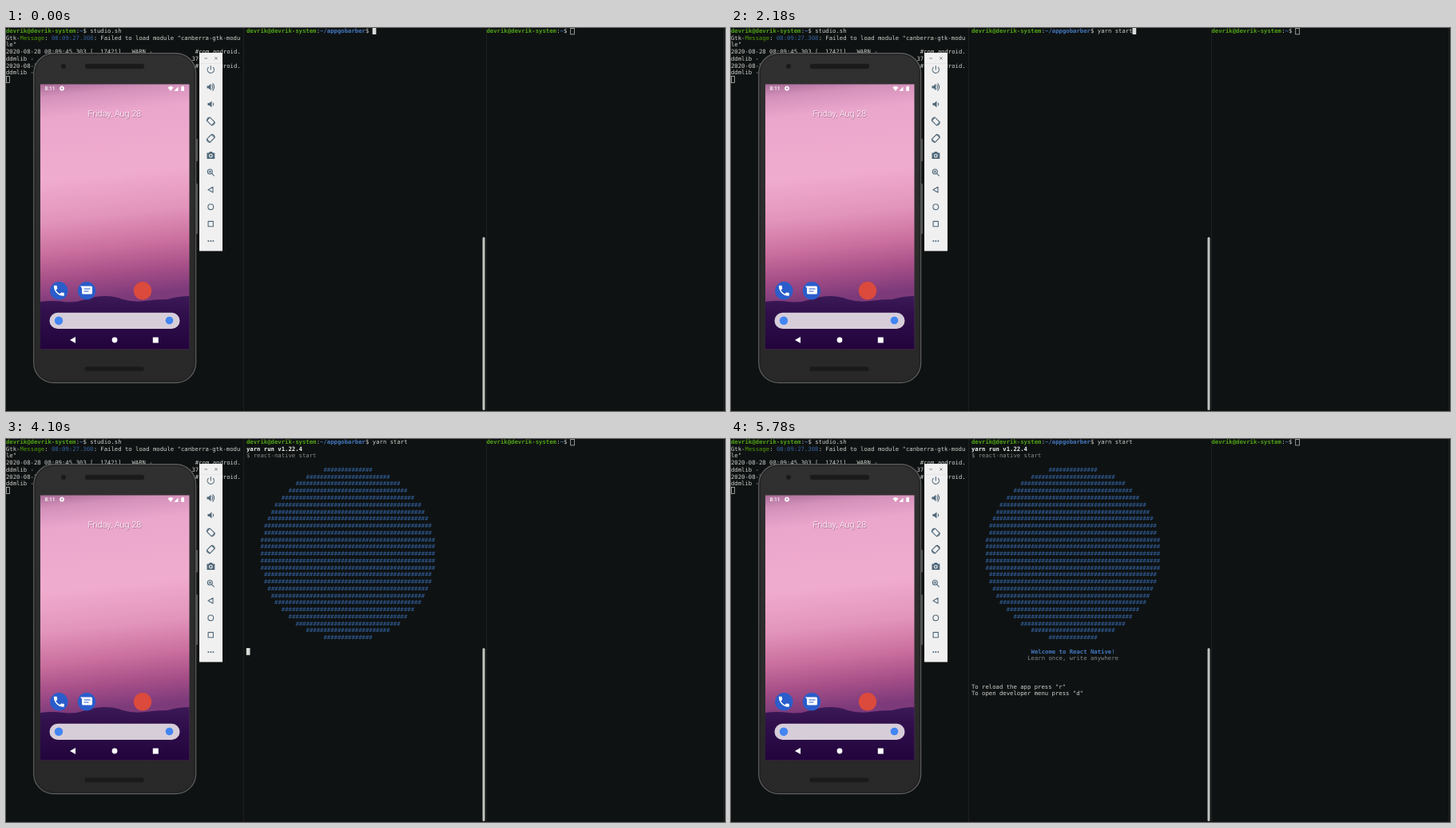
An HTML page that plays this animation: 900 px wide and 480 px high, repeating every 8 s.

```html
<!DOCTYPE html>
<html lang="en">
<head>
<meta charset="utf-8">
<title>Terminal and emulator</title>
<style>
html, body { margin: 0; width: 100%; height: 100%; overflow: hidden; background: #0f1212; }
svg { display: block; width: 900px; height: 480px; }
text { white-space: pre; text-rendering: geometricPrecision; }
.term text { font: 7.28px "DejaVu Sans Mono", monospace; fill: #cdd0cb; }
.term .green { fill: #4e9a06; }
.term .user { fill: #50a518; font-weight: bold; }
.term .blue { fill: #3465a4; }
.term .path { fill: #4479c0; font-weight: bold; }
.term .dim { fill: #858885; }
.term .bright { fill: #eef0ec; font-weight: bold; }
.ui { font-family: Roboto, sans-serif; fill: #fff; }
.tools { fill: none; stroke: #50697a; stroke-width: 1.1; stroke-linejoin: round; stroke-linecap: round; }
.tools .f { fill: #50697a; stroke: none; }
</style>
</head>
<body>
<svg viewBox="0 0 900 480">
  <defs>
    <linearGradient id="sky" x1="0" y1="0" x2="0.06" y2="1">
      <stop offset="0" stop-color="#aa6c98"/>
      <stop offset=".05" stop-color="#d391ba"/>
      <stop offset=".13" stop-color="#eba6cc"/>
      <stop offset=".36" stop-color="#f0acce"/>
      <stop offset=".52" stop-color="#e294bb"/>
      <stop offset=".64" stop-color="#ca6f9e"/>
      <stop offset=".74" stop-color="#a64f88"/>
      <stop offset=".83" stop-color="#7d3a7a"/>
    </linearGradient>
    <linearGradient id="hill" x1="0" y1="0" x2="0" y2="1">
      <stop offset="0" stop-color="#3c1a57"/>
      <stop offset=".3" stop-color="#31104c"/>
      <stop offset="1" stop-color="#22043c"/>
    </linearGradient>
    <linearGradient id="case" x1="0" y1="0" x2="0" y2="1">
      <stop offset="0" stop-color="#303030"/>
      <stop offset="1" stop-color="#282828"/>
    </linearGradient>
    <g id="turn">
      <rect x="-2.8" y="-4.2" width="5.6" height="8.4" transform="rotate(-45)"/>
      <path d="M-4.9 -1.5Q-4.5 -4.5 -1.5 -5M4.9 1.5Q4.5 4.5 1.5 5"/>
    </g>
  </defs>

  <rect width="900" height="480" fill="#0f1212"/>
  <path d="M297.5 0V480M601.5 0V480M898.5 0V480" stroke="#1d2121"/>
  <rect x="596.5" y="262" width="3" height="217" rx="1.5" fill="#c2c4c2"/>

  <g class="term" id="term"></g>
  <rect id="cursor" width="4.7" height="8.8" fill="#d9dcd8"/>
  <g fill="none" stroke="#b4b7b3" stroke-width=".8">
    <rect x=".5" y="60.5" width="4" height="8"/>
    <rect x="706.7" y=".5" width="4.8" height="7.4"/>
  </g>

  <!-- phone -->
  <path d="M239 139V167M239 195V258" stroke="#6c6e6e" stroke-width="1.4"/>
  <rect x="34.7" y="31.7" width="203" height="413" rx="25" fill="url(#case)" stroke="#5c5d5d" stroke-width="1.2"/>
  <rect x="36.4" y="33.4" width="199.6" height="409.6" rx="23.5" fill="none" stroke="#202020"/>
  <g fill="#191a1a" stroke="#222323" stroke-width=".6">
    <rect x="99" y="45" width="74" height="6" rx="2.5"/>
    <rect x="98.5" y="424.5" width="74" height="5.5" rx="2.5"/>
    <circle cx="72" cy="48" r="3"/>
  </g>
  <rect x="43" y="70.5" width="186.5" height="332" fill="url(#sky)"/>
  <path fill="url(#hill)" d="M43 343Q58 341 72 343T100 340Q112 336 124 336T146 340Q160 344 174 342T202 340Q216 336 229.5 336V402.5H43Z"/>

  <g class="ui">
    <text x="48.5" y="78.2" font-size="6.7" font-weight="500">8:11</text>
    <circle cx="70" cy="75.7" r="1.9" fill="none" stroke="#fff" stroke-width="1.5"/>
    <circle cx="70" cy="75.7" r="2.8" fill="none" stroke="#fff" stroke-width=".8" stroke-dasharray="1.1"/>
    <path d="M202.5 74.5Q206 71.5 209.5 74.5L206 79ZM210.5 79L215.5 73.5V79ZM219.3 73.5H220.3V72.7H222V73.5H223V79H219.3Z"/>
    <g font-size="10.9" font-weight="300" text-anchor="middle">
      <text x="136.6" y="112" fill="#6b3a5c" opacity=".6">Friday, Aug 28</text>
      <text x="136" y="111.3">Friday, Aug 28</text>
    </g>
  </g>

  <g fill="#2a5dcb">
    <circle cx="66.3" cy="329.3" r="11.2"/>
    <circle cx="101" cy="329.3" r="11.2"/>
  </g>
  <path fill="#fff" transform="translate(57.7 320.7) scale(.72)" d="M6.6 10.8Q8.8 15.2 13.2 17.4L15.4 15.2Q15.9 14.8 16.4 14.9Q18.2 15.5 20 15.5Q21 15.5 21 16.5V20Q21 21 20 21A17 17 0 0 1 3 4Q3 3 4 3H7.5Q8.5 3 8.5 4Q8.5 5.8 9.1 7.6Q9.2 8.1 8.8 8.6Z"/>
  <path d="M93 323.5H106.5Q108 323.5 108 325V332Q108 333.5 106.5 333.5H96.5Q95 333.5 95 332V326Z" fill="#fff"/>
  <path d="M97.5 327H105.5M97.500 330H103.5" stroke="#2a5dcb" stroke-width="1.2"/>
  <circle cx="171" cy="329.3" r="11.2" fill="#db4a3c"/>

  <rect x="54.5" y="356.7" width="163" height="20.3" rx="10.1" fill="#d6cdd9"/>
  <circle cx="66" cy="366.8" r="5.2" fill="#4285f4"/>
  <circle cx="204.5" cy="366.5" r="4.8" fill="#4285f4"/>
  <g fill="#fff">
    <path d="M80 391L87 387V395Z"/>
    <circle cx="136" cy="391" r="3.4"/>
    <rect x="183.8" y="387.6" width="7" height="7"/>
  </g>

  <!-- emulator toolbar -->
  <rect x="242" y="31" width="29" height="248.5" fill="#f1f0f0"/>
  <path d="M242 44.5H271" stroke="#e2e2e2" stroke-width=".7"/>
  <path d="M248.5 38H252M261.3 36.3L264.5 39.5M264.5 36.3L261.3 39.5" stroke="#777" stroke-width=".9"/>
  <g class="tools">
    <path d="M256.3 47.5V52M253.3 49.3A4.2 4.2 0 1 0 259.3 49.3"/>
    <path class="f" d="M251.5 72.5H253.5L256.5 69.8V78.2L253.5 75.5H251.5ZM252.5 94H254.5L257.5 91.5V99.5L254.5 97H252.5Z"/>
    <path d="M258 71.8Q259.5 74 258 76.2M258.8 69.6Q262.5 74 258.8 78.4M259.2 94Q260.3 95.5 259.2 97"/>
    <use href="#turn" transform="translate(256.3 117)"/>
    <use href="#turn" transform="translate(256.3 138.3) scale(-1 1)"/>
    <path class="f" fill-rule="evenodd" d="M251.5 156.5H253.8L255 155H257.7L259 156.5H261.3V164H251.5ZM256.3 157.7A2.4 2.4 0 1 0 256.4 157.7Z"/>
    <circle class="f" cx="256.3" cy="160.1" r="1.3"/>
    <circle cx="255.3" cy="180" r="3"/>
    <path d="M257.6 182.3L260.4 185.2M254 180H256.6M255.3 178.7V181.3"/>
    <path d="M253 202.7L259 199.3V206.1Z"/>
    <circle cx="256.3" cy="224.2" r="3.4"/>
    <rect x="253.1" y="242.4" width="6.3" height="6.3"/>
    <g class="f"><circle cx="253.3" cy="267" r="1"/><circle cx="256.3" cy="267" r="1"/><circle cx="259.3" cy="267" r="1"/></g>
  </g>
</svg>

<script>
const LOOP = 8000, CELL = 4.385, LINE = 8.76;
const LEFT = 0, MID = 301, RIGHT = 601.5;
const HOST = 'devrik@devrik-system';
const COMMAND = 'yarn start';
const KEYS = [500, 580, 740, 820, 980, 1380, 1620, 1700, 1860, 1940];
const BLINKS = [2580, 2980, 3380, 3780, 4180, 4580, 5060, 5380, 5780];
// time and row of each cursor jump
const JUMPS = [[3060, 1], [3220, 2], [3460, 3], [3940, 30], [4820, 38]];

const term = document.getElementById('term');
const cursor = document.getElementById('cursor');
const timed = [];

function put(pane, row, col, str, cls = '', at = 0) {
  const el = document.createElementNS('http://www.w3.org/2000/svg', 'text');
  el.setAttribute('x', pane + col * CELL);
  el.setAttribute('y', row * LINE + 5.9);
  el.setAttribute('class', cls);
  el.textContent = str;
  term.append(el);
  if (at) timed.push({ el, at });
  return el;
}

function prompt(pane, dir) {
  put(pane, 0, 0, HOST, 'user');
  put(pane, 0, 20, ':');
  put(pane, 0, 21, dir, 'path');
  put(pane, 0, 21 + dir.length, '$');
}

prompt(LEFT, '~');
prompt(MID, '~/appgobarber');
prompt(RIGHT, '~');

put(LEFT, 0, 24, 'studio.sh');
put(LEFT, 1, 0, 'Gtk-');
put(LEFT, 1, 4, 'Message', 'green');
put(LEFT, 1, 11, ':');
put(LEFT, 1, 13, '08:09:27.308', 'blue');
put(LEFT, 1, 25, ': Failed to load module "canberra-gtk-modu');
put(LEFT, 2, 0, 'le"');
for (const row of [3, 5]) {
  put(LEFT, row, 0, '2020-08-28 08:09:45.303 [  17421]   WARN -');
  put(LEFT, row, 54, '#com.android.');
  put(LEFT, row + 1, 0, 'ddmlib - ');
}
put(LEFT, 4, 53, '37');

const typed = put(MID, 0, 36, '');
put(MID, 1, 0, 'yarn run v1.22.4', 'bright', 3220);
put(MID, 2, 0, '$ react-native start', 'dim', 3460);

// plain disc of hash signs
for (let i = 0; i < 25; i++) {
  const half = Math.round(Math.sqrt(109 ** 2 - ((i - 12) * LINE) ** 2) / CELL);
  put(MID, i + 4, 29 - half, '#'.repeat(half * 2), 'blue', 3940);
}

put(MID, 30, 17, 'Welcome to React Native!', 'path', 4820);
put(MID, 31, 16, 'Learn once, write anywhere', 'dim', 4820);
put(MID, 35, 0, 'To reload the app press "r"', '', 4820);
put(MID, 36, 0, 'To open developer menu press "d"', '', 4820);

const passed = (times, t) => times.filter(at => at <= t).length;

function draw(t) {
  const count = passed(KEYS, t);
  typed.textContent = COMMAND.slice(0, count);
  for (const { el, at } of timed) el.style.display = t >= at ? '' : 'none';

  const jumps = passed(JUMPS.map(j => j[0]), t);
  const row = jumps ? JUMPS[jumps - 1][1] : 0;
  const col = jumps ? 0 : 36 + count;
  cursor.setAttribute('x', MID + col * CELL - 0.2);
  cursor.setAttribute('y', row * LINE - 0.8);
  cursor.style.display = passed(BLINKS, t) % 2 ? 'none' : '';
}

const start = performance.now();
function tick() {
  draw((performance.now() - start) % LOOP);
  requestAnimationFrame(tick);
}
tick();
</script>
</body>
</html>
```
